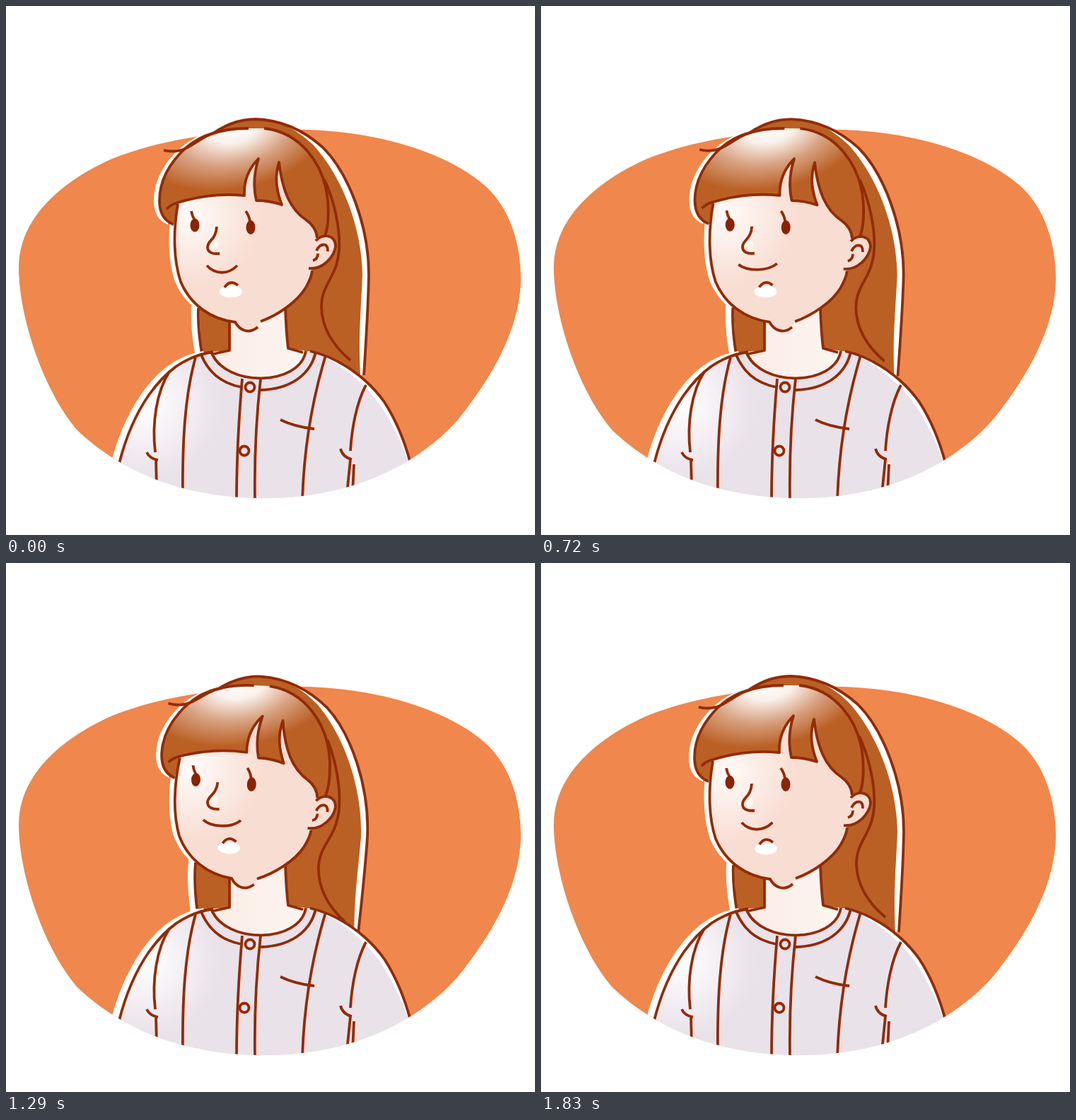
Write an HTML page that moves like this. It is 748 by 748 pixels and loops after 1.86 s.

```html
<!DOCTYPE html>
<html lang="en">
<head>
<meta charset="utf-8">
<title>Portrait</title>
<style>
  html, body { margin: 0; width: 100%; height: 100%; overflow: hidden; background: #fff; }
  svg { display: block; width: 100vw; height: 100vh; }
  .line { fill: none; stroke: #932b04; stroke-width: 3.8; stroke-linejoin: round; }
  .ink { fill: #8a2400; }
  .white { fill: #fff; }
  .hair { fill: #ba6025; }
</style>
</head>
<body>
<svg viewBox="0 0 748 748">
  <defs>
    <path id="blob" d="M18 370C18 300 78 248 150 216C232 183 337 173 430 175C530 179 622 207 676 253C712 284 728 335 728 388C726 455 690 522 638 586C590 640 500 696 365 696C245 696 158 655 100 599C50 540 18 435 18 370Z"/>
    <clipPath id="inBlob"><use href="#blob"/></clipPath>

    <path id="backHair" d="M285 186C305 170 328 160 353 160C385 161 418 173 448 200C484 236 513 310 513 380C512 430 509 475 506 522L279 522L277 490C273 468 271 448 272 425Z"/>
    <path id="frontHair" d="M237 309L243 278C275 268 305 265 337 268C336 245 345 228 357 216C350 238 350 258 354 275Q372 275 390 281C380 255 381 238 386 221C391 262 402 288 425 303C435 310 439 318 440 330C455 322 457 300 455 275C450 222 415 178 365 173L343 173C322 173 306 175 294 179C250 192 217 235 217 275C217 293 224 304 237 309Z"/>
    <path id="face" d="M243 278C236 320 237 360 247 390C261 423 290 443 323 447C330 458 343 465 356 454L360 446C385 437 412 418 424 398Q432 384 433 371C447 372 462 356 466 342C466 325 450 320 440 330L438 255L400 205L340 205L300 250Z"/>
    <path id="shirt" d="M290 489C250 496 225 518 202 550C180 582 168 615 160 645L160 710L572 710L572 645C565 620 553 588 535 560C510 525 470 497 430 488L424 488C415 538 310 540 290 489Z"/>

    <radialGradient id="shine" gradientUnits="userSpaceOnUse" cx="0" cy="0" r="1" gradientTransform="translate(322 172) rotate(-12) scale(142 86)">
      <stop offset="0" stop-color="#fff"/>
      <stop offset=".25" stop-color="#faf1eb"/>
      <stop offset=".6" stop-color="#d8a281"/>
      <stop offset="1" stop-color="#ba6025"/>
    </radialGradient>
    <radialGradient id="skin" gradientUnits="userSpaceOnUse" cx="262" cy="296" r="100">
      <stop offset="0" stop-color="#fffaf8"/>
      <stop offset="1" stop-color="#f8ddd2"/>
    </radialGradient>
    <linearGradient id="neckTone">
      <stop offset="0" stop-color="#fbece5"/>
      <stop offset="1" stop-color="#fdf5f1"/>
    </linearGradient>
    <radialGradient id="cloth" gradientUnits="userSpaceOnUse" cx="200" cy="565" r="105">
      <stop offset="0" stop-color="#fff"/>
      <stop offset=".4" stop-color="#f6f2f6"/>
      <stop offset="1" stop-color="#e9e2e9"/>
    </radialGradient>
  </defs>

  <use href="#blob" fill="#f0874c"/>

  <g class="tilt">
    <g class="white" transform="translate(-8 0)">
      <use href="#backHair" x="-2"/><use href="#frontHair"/><use href="#face"/>
    </g>
    <use href="#backHair" class="white"/>
    <path class="hair" d="M285 186C305 170 328 160 353 160C385 161 408 172 434 196C473 238 503 310 504 380C502 430 498 468 501 522L282 522L275 470L273 425Z"/>
    <path class="line" d="M285 186C305 170 328 160 353 160C385 161 418 173 448 200C484 236 513 310 513 380C512 430 509 475 506 522M272 427C271 448 273 468 277 492"/>
    <path class="line" d="M450 245C464 275 473 315 471 345C468 385 446 392 446 426C447 460 468 485 487 501"/>
  </g>

  <g clip-path="url(#inBlob)">
    <use href="#shirt" class="white" transform="translate(-11 -1)"/>
    <use href="#shirt" class="white"/>
    <path fill="url(#neckTone)" d="M316 430V487L290 489C310 540 415 538 424 488L399 484L395 420Z"/>
    <path fill="url(#cloth)" d="M290 489C250 496 225 518 202 550C180 582 168 615 160 645L160 710L572 710L569 645C560 620 548 592 529 564C505 531 470 502 430 488L424 488C415 538 310 540 290 489Z"/>
    <g class="line">
      <path d="M293 489C250 496 225 518 202 550C180 582 168 615 160 647M430 488C470 497 510 525 535 560C553 588 565 620 572 647"/>
      <path d="M290 489C310 540 415 538 424 488M275 491C285 516 302 533 333 539M360 543C399 542 430 524 438 489"/>
      <path d="M316 446V487L293 492M395 426Q396 460 399 484L420 490"/>
      <path d="M231 517C213 545 206 590 211 631M199 631Q203 640 215 642M212 641L213 680"/>
      <path d="M268 497C253 550 249 615 250 700M452 494C432 560 421 630 419 700"/>
      <path d="M334 527C329 585 326 640 326 700M360 527C354 580 351 640 352 700"/>
      <path d="M509 536C496 560 489 596 487 629M473 626Q476 638 489 641M487 641L482 690M492 648L490 690"/>
      <path d="M388 585Q408 595 436 598"/>
      <circle cx="345" cy="539" r="6.5"/>
      <circle cx="337" cy="629" r="6.5"/>
    </g>
  </g>

  <g class="tilt">
    <use href="#face" fill="url(#skin)"/>
    <ellipse class="white" cx="318" cy="404" rx="16" ry="8.5"/>
    <ellipse class="white" cx="295" cy="338" rx="5" ry="7" opacity=".6"/>
    <use href="#frontHair" fill="url(#shine)"/>
    <g class="line">
      <path d="M223 204C254 211 264 192 288 182C305 175 324 173 343 173"/>
      <path d="M292 180C250 192 217 235 217 275C217 293 224 304 237 309"/>
      <path d="M365 173C415 178 450 222 455 275C457 300 455 314 451 325"/>
      <path d="M227 287Q234 280 243 278C275 268 305 265 337 268C336 245 345 228 357 216C350 238 350 258 354 275Q372 275 390 281C380 255 381 238 386 221C391 262 402 288 425 303C435 310 439 318 440 328"/>
      <path d="M243 280C236 320 237 360 247 390C261 423 290 443 324 447C330 458 343 465 356 454M360 446C385 437 412 418 424 398Q432 384 433 374"/>
      <path d="M438 332C447 321 466 323 466 340C464 354 449 373 428 371"/>
      <path d="M439 346C444 335 456 334 455 347M441 350Q441 358 434 360"/>
      <path d="M262 290Q263 297 267 303M339 290Q344 297 345 305"/>
      <path d="M298 312C297 331 285 331 285 341C285 349 293 351 302 350"/>
      <path d="M309 398Q317 386 328 395"/>
      <path id="smile"/>
    </g>
    <ellipse class="ink" cx="267" cy="310" rx="6.5" ry="9.5"/>
    <ellipse class="ink" cx="346" cy="313" rx="6.5" ry="10"/>
  </g>
</svg>
<script>
  const LOOP = 1860, STEP = 30, TILT_START = 540, MAX_TILT = 2.8;
  const tilted = document.querySelectorAll('.tilt');
  const smile = document.getElementById('smile');

  function draw(t) {
    const phase = Math.max(0, t - TILT_START) / (LOOP - TILT_START);
    const angle = MAX_TILT * (1 - Math.cos(2 * Math.PI * phase)) / 2;
    tilted.forEach(g => g.setAttribute('transform', `rotate(${angle} 345 340)`));

    // The smile widens and flattens, then relaxes again over the loop.
    const s = Math.sin(Math.PI * t / LOOP);
    const x1 = 284 - 4.8 * s, x2 = 327 + 7.5 * s;
    const y1 = 367 - s, y2 = 367 - 3 * s;
    smile.setAttribute('d', `M${x1} ${y1}C${x1 + 11} ${379 - 4 * s} ${x2 - 14} ${381 - 5 * s} ${x2} ${y2}`);
  }

  const start = performance.now();
  function frame() {
    const t = (performance.now() - start) % LOOP;
    draw(Math.floor(t / STEP) * STEP);
    requestAnimationFrame(frame);
  }
  frame();
</script>
</body>
</html>
```
